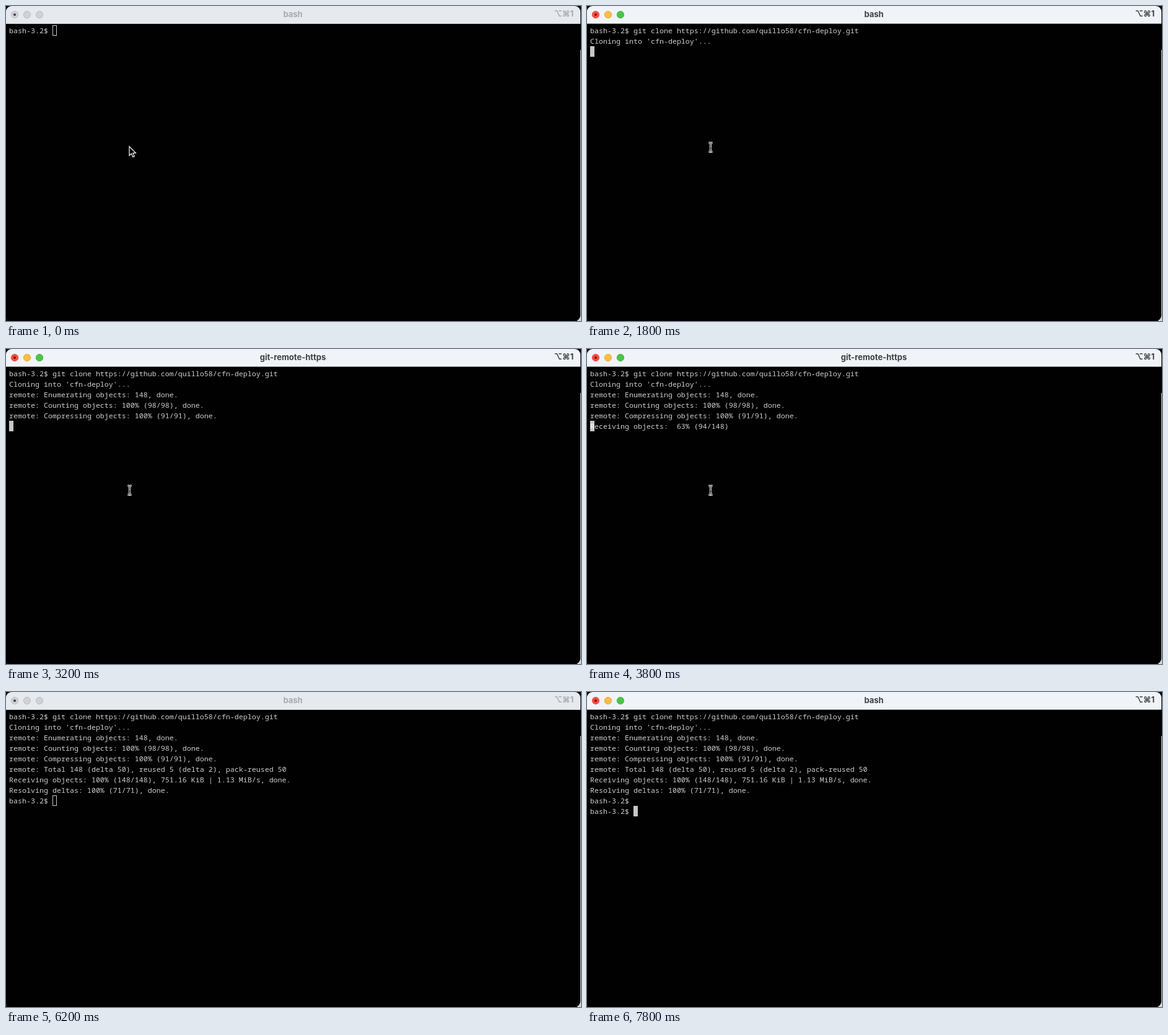
Write an HTML page with a canvas that moves like this. It is 928x509 px and loops after 8000 ms.

```html
<!DOCTYPE html>
<html lang="en">
<head>
<meta charset="utf-8">
<title>Terminal</title>
<style>
  html, body { margin: 0; width: 100%; height: 100%; overflow: hidden; background: #000; }
  canvas { display: block; width: 928px; height: 509px; }
</style>
</head>
<body>
<canvas id="stage" width="928" height="509"></canvas>
<script>
const ctx = document.getElementById('stage').getContext('2d');
const LOOP = 8000, STEP = 200;
const CELL = 7, LINE = 17, LEFT = 5, TOP = 31;
const MONO = '11.667px "Noto Sans Mono", monospace';
const BOLD = 'bold 13px Inter, "DejaVu Sans", sans-serif';
const INK = '#cdcdcd', CARET = '#c7c7c7';

const prompt = 'bash-3.2$ ';
const command = 'git clone https://github.com/quillo58/cfn-deploy.git';
const remote = [
  'remote: Enumerating objects: 148, done.',
  'remote: Counting objects: 100% (98/98), done.',
  'remote: Compressing objects: 100% (91/91), done.'
];
const summary = [
  'remote: Total 148 (delta 50), reused 5 (delta 2), pack-reused 50',
  'Receiving objects: 100% (148/148), 751.16 KiB | 1.13 MiB/s, done.',
  'Resolving deltas: 100% (71/71), done.'
];

const themes = {
  active: {
    bar: '#f0f4f9', edge: '#8e9194', text: '#3e4043', dot: '#760b08',
    fills: ['#fc4d44', '#fabd45', '#4cc547'],
    rims: ['#e2463f', '#e0a235', '#3bad3b']
  },
  inactive: {
    bar: '#e6e9ee', edge: '#c0c3c7', text: '#a7aaae', dot: '#3c3d40',
    fills: Array(3).fill('#cfd1d5'),
    rims: Array(3).fill('#b5b8bc')
  }
};

function receiving(t) {
  const count = Math.max(2, Math.round((t - 3400) / STEP * 47));
  const percent = String(Math.floor(count / 148 * 100)).padStart(3);
  return `Receiving objects: ${percent}% (${count}/148)`;
}

// Terminal contents; the caret sits at the end of the last line unless col is given.
function screenAt(t) {
  if (t < 1800) return { lines: [prompt] };
  const lines = [prompt + command, "Cloning into 'cfn-deploy'..."];
  if (t < 3200) return { lines: [...lines, ''] };
  lines.push(...remote);
  if (t < 3400) return { lines: [...lines, ''] };
  if (t < 4200) return { lines: [...lines, receiving(t)], col: 0 };
  lines.push(...summary, prompt);
  if (t >= 7400) lines.push(prompt);
  return { lines };
}

function titleAt(t) {
  if (t < 2200 || t >= 5200) return 'bash';
  return t < 3000 ? 'git' : 'git-remote-https';
}

function circle(x, y, r, fill, stroke) {
  ctx.beginPath();
  ctx.arc(x, y, r, 0, Math.PI * 2);
  ctx.fillStyle = fill;
  ctx.fill();
  if (stroke) {
    ctx.strokeStyle = stroke;
    ctx.lineWidth = 0.8;
    ctx.stroke();
  }
}

function rect(x, y, w, h, fill) {
  ctx.fillStyle = fill;
  ctx.fillRect(x, y, w, h);
}

function label(text, x, y, font, color, align = 'left') {
  ctx.font = font;
  ctx.fillStyle = color;
  ctx.textAlign = align;
  ctx.fillText(text, x, y);
}

function drawWindow(theme, title) {
  rect(0, 0, 928, 509, '#0b0b0d');
  rect(926, 71, 2, 438, '#d9d8d2');
  rect(922, 504, 6, 5, '#d9d8d2');

  ctx.save();
  ctx.beginPath();
  ctx.roundRect(0, 0, 927, 509, 9);
  ctx.clip();
  rect(0, 0, 927, 509, '#010102');
  rect(0, 0, 927, 28, theme.bar);
  rect(0, 28, 927, 1, theme.edge);
  ctx.restore();

  theme.fills.forEach((fill, i) => circle(14 + 20 * i, 14, 5.7, fill, theme.rims[i]));
  circle(14, 14, 2, theme.dot);
  label(title, 463, 18, BOLD, theme.text, 'center');
  label('⌥⌘1', 916, 17, BOLD, theme.text, 'right');
}

function drawText({ lines, col }, active) {
  lines.forEach((text, i) => label(text, LEFT, TOP + 13 + i * LINE, MONO, INK));
  const last = lines.length - 1;
  const column = col ?? lines[last].length;
  const x = LEFT + column * CELL, y = TOP + last * LINE;
  if (active) {
    rect(x, y, CELL, LINE, CARET);
    label(lines[last][column] || '', x, y + 13, MONO, '#fff');
  } else {
    ctx.strokeStyle = CARET;
    ctx.lineWidth = 1;
    ctx.strokeRect(x + 0.5, y + 0.5, CELL - 1, LINE - 1);
  }
}

function drawPointer(path, x, y, strokes) {
  ctx.save();
  ctx.translate(x, y);
  for (const [color, width] of strokes) {
    ctx.strokeStyle = color;
    ctx.lineWidth = width;
    ctx.stroke(path);
  }
  ctx.restore();
}

const arrow = new Path2D('M0 0V14.6L3.4 11.5 5.8 17 8.2 16 5.9 10.7H10.5Z');
const beam = new Path2D('M-3.2 -7.3H-1.5L0 -6 1.5 -7.3H3.2M0 -6V6M-3.2 7.3H-1.5L0 6 1.5 7.3H3.2M-1.8 1.5H1.8');

function draw(now) {
  const t = Math.floor(now % LOOP / STEP) * STEP;
  const active = (t >= 400 && t < 5400) || t >= 6800;
  drawWindow(active ? themes.active : themes.inactive, titleAt(t));
  drawText(screenAt(t), active);
  if (t < 400) drawPointer(arrow, 199, 227, [['#fff', 1.2]]);
  else if (t < 4400) drawPointer(beam, 199.5, 228.3, [['#fff', 2.9], ['#000', 1]]);
}

const start = performance.now();
function tick() {
  draw(performance.now() - start);
  requestAnimationFrame(tick);
}
tick();
</script>
</body>
</html>
```
